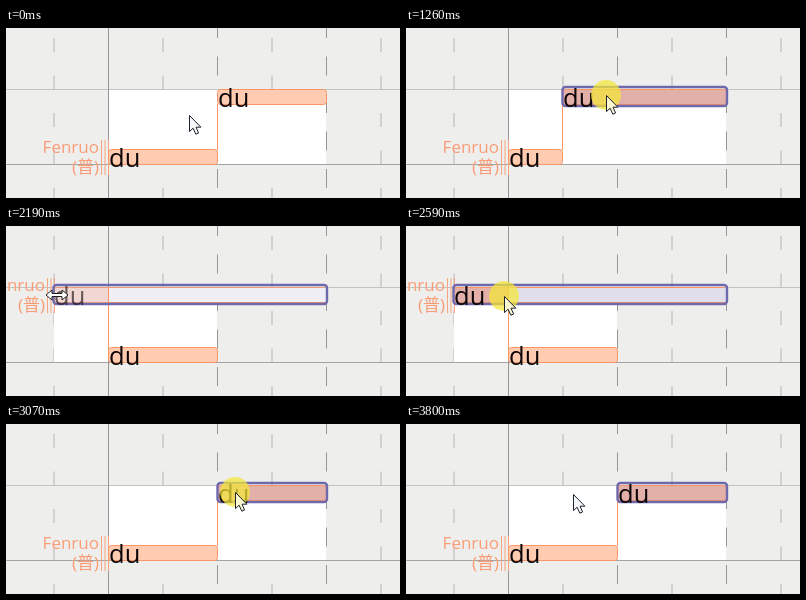
Recreate the animation shown at these times as an HTML page. Size 394 by 170 pixels, loop 4260 ms.

```html
<!DOCTYPE html>
<html lang="en">
<head>
<meta charset="utf-8">
<title>Note editor</title>
<style>
  html, body { margin: 0; width: 100%; height: 100%; overflow: hidden; background: #eeeeec; }
  svg { display: block; width: 394px; height: 170px; }
  text { font-family: "Open Sans", "Noto Sans", "Noto Sans CJK SC", "Noto Sans CJK", sans-serif; }
  .lyric { font-size: 25.5px; fill: #0c0608; }
  .label { font-size: 17px; font-weight: 500; fill: #fb9c77; text-anchor: end; }
  .note { fill: #ffccb2; stroke: #fb9465; }
  .link { stroke: #fb9465; fill: none; }
</style>
</head>
<body>
<svg viewBox="0 0 394 170">
  <g id="grid"></g>
  <rect id="area" y="62" height="74" fill="#fff"/>
  <path d="M102.5 0V170" stroke="#959595"/>
  <g id="singer">
    <text class="label" x="93" y="125">Fenruo</text>
    <text class="label" x="93" y="145">(普)</text>
    <path d="M95.5 112V147M99 112V147M102.5 112V147" stroke="#fba27e" fill="none"/>
  </g>
  <path id="link" class="link"/>
  <rect id="low" class="note" x="102.5" y="121.5" height="15" rx="3"/>
  <text class="lyric" x="103" y="139">du</text>
  <rect id="body" class="note" y="61.5" height="15" rx="3"/>
  <g id="covered">
    <rect id="rest" x="103" y="62" width="217" height="14" fill="#e1deec"/>
    <path class="link" d="M102.5 61V76.5H320"/>
  </g>
  <rect id="frame" y="59" height="19" rx="3" fill="none" stroke="#6e68ac" stroke-width="2.4"/>
  <text id="word" class="lyric" y="79">du</text>
  <circle id="press" r="15" fill="#f4e838" fill-opacity=".72"/>
  <path id="arrow" d="M.5 .5V16.6L4.1 13.2L6.8 19.2L9.6 18L7 12.2H11.9Z" stroke="#1c2230" stroke-linejoin="round"/>
  <path id="resize" d="M-11 0L-5 -5V-1.5H5V-5L11 0L5 5V1.5H-5V5Z" fill="#fff" stroke="#222" stroke-linejoin="round"/>
</svg>
<script>
const LOOP = 4260, END = 321, FIRST = 103;
const $ = id => document.getElementById(id);
const set = (id, attrs) => {
  for (const k in attrs) $(id).setAttribute(k, attrs[k]);
};
const show = (id, on) => { $(id).style.display = on ? "" : "none"; };

// time, pointer x, pointer y, mode, note start, selected
// modes: a arrow, r resize, p pressed
const steps = [
  [0, 183, 87, "a", 212, 0],
  [460, 186, 87, "a", 212, 0],
  [530, 192, 85, "a", 212, 0],
  [600, 199, 82, "a", 212, 0],
  [660, 205, 79, "a", 212, 0],
  [730, 211, 77, "r", 212, 0],
  [800, 214, 75, "r", 212, 0],
  [860, 214, 72, "r", 212, 0],
  [930, 214, 70, "r", 212, 0],
  [1130, 212, 68, "p", 212, 1],
  [1200, 200, 67, "p", 157, 1],
  [1330, 160, 68, "p", 157, 1],
  [1400, 132, 70, "p", 103, 1],
  [1460, 108, 71, "p", 103, 1],
  [1530, 87, 72, "p", 48, 1],
  [1600, 72, 72, "p", 48, 1],
  [1660, 57, 72, "p", 48, 1],
  [1730, 53, 72, "a", 48, 1],
  [1930, 34, 71, "a", 48, 1],
  [2000, 11, 69, "a", 48, 1],
  [2130, 36, 69, "a", 48, 1],
  [2190, 51, 69, "r", 48, 1],
  [2390, 52, 69, "p", 48, 1],
  [2460, 60, 69, "p", 48, 1],
  [2530, 79, 70, "p", 48, 1],
  [2590, 98, 70, "p", 48, 1],
  [2660, 119, 70, "p", 103, 1],
  [2790, 148, 69, "p", 103, 1],
  [2850, 169, 68, "p", 157, 1],
  [2920, 186, 68, "p", 157, 1],
  [3000, 210, 68, "p", 157, 1],
  [3070, 229, 68, "p", 212, 1],
  [3470, 215, 74, "a", 212, 1],
  [3530, 165, 96, "a", 212, 1],
  [3600, 104, 119, "a", 212, 1],
  [3660, 76, 126, "a", 212, 1],
  [3730, 128, 92, "a", 212, 1],
  [3800, 167, 70, "a", 212, 1]
];

function drawGrid() {
  const line = (d, stroke, dash = "none", offset = 0) =>
    `<path d="${d}" stroke="${stroke}" stroke-dasharray="${dash}" stroke-dashoffset="${offset}"/>`;
  let s = line("M0 61.5H394", "#c3c3c1") + line("M0 136.5H394", "#a3a3a2");
  for (let i = -1; i < 6; i++) {
    if (!i) continue;
    const d = `M${102.5 + 54.5 * i} 0V170`;
    s += i % 2 ? line(d, "#b4b4b2", "14 23.5", 27.5) : line(d, "#969696", "19 18.5", 9);
  }
  $("grid").innerHTML = s;
}

function render(t) {
  const [, x, y, mode, start, sel] = steps.findLast(s => s[0] <= t);
  const early = start < FIRST, faded = mode === "r", pressed = mode === "p";
  const left = early ? start : FIRST;
  const joint = early ? FIRST : start;
  const lowEnd = start > FIRST ? start : 212;

  set("area", { x: left, width: (early ? 211 : 320) - left });
  set("singer", { transform: early ? "translate(-54 -60)" : "" });
  set("link", { d: `M${joint - .5} 76V122` });
  set("low", { width: lowEnd - FIRST });
  set("body", {
    x: start - .5, width: END - start,
    "fill-opacity": faded ? .5 : 1, "stroke-opacity": faded ? .8 : 1
  });
  $("body").style.fill = sel ? "#e2b0a9" : "#ffccb2";
  set("rest", { fill: faded ? "#f1eff6" : "#e1deec" });
  show("covered", early);
  set("word", { x: start, opacity: faded ? .62 : 1 });

  set("frame", { x: start - .5, width: END - start + .5 });
  show("frame", sel);
  const at = { transform: `translate(${x} ${y})` };
  for (const id of ["press", "arrow", "resize"]) set(id, at);
  set("arrow", { fill: pressed ? "#fbf7d0" : "#f6f8fa" });
  show("press", pressed);
  show("arrow", !faded);
  show("resize", faded);
}

drawGrid();
render(0);
const origin = performance.now();
function tick() {
  render((performance.now() - origin) % LOOP);
  requestAnimationFrame(tick);
}
requestAnimationFrame(tick);
</script>
</body>
</html>
```
